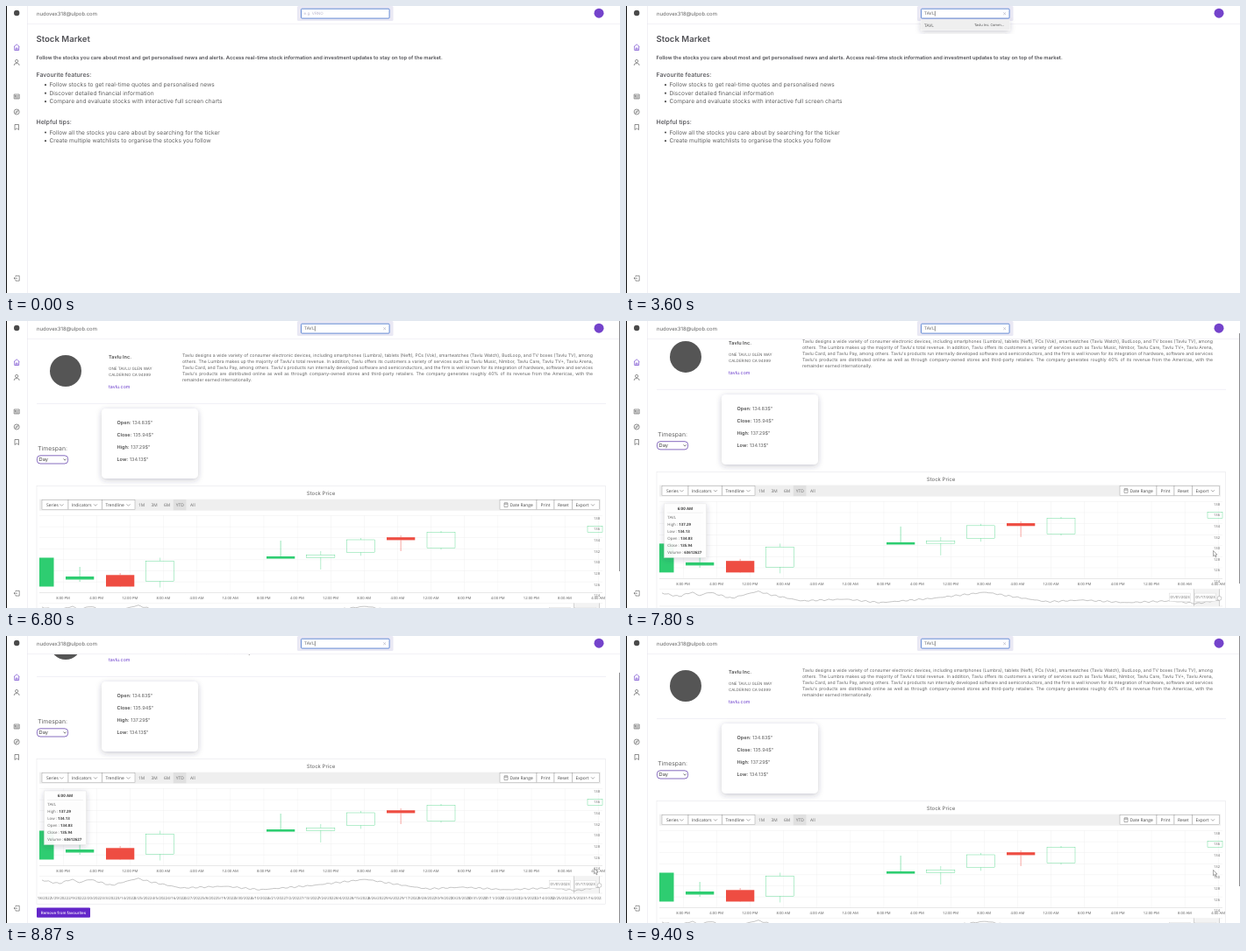
Animation, 700 px wide and 328 px high, one loop 9.79 s. Source, as an HTML page:

```html
<!DOCTYPE html>
<html lang="en">
<head>
<meta charset="utf-8">
<title>Stock search</title>
<style>
html, body { margin: 0; width: 100%; height: 100%; overflow: hidden; background: #fff; }
svg { display: block; width: 100vw; height: 100vh; }
text { font-family: Inter, "Open Sans", sans-serif; text-rendering: geometricPrecision; white-space: pre; }
.ui { font-family: "Open Sans", "Noto Sans", sans-serif; }
.about { font: 5.1px/7.05px Inter, sans-serif; color: #666; text-rendering: geometricPrecision; }
.about div { white-space: nowrap; text-align-last: justify; }
.about div:last-child { text-align-last: left; }
</style>
</head>
<body>
<svg id="stage" viewBox="0 0 700 328" xmlns="http://www.w3.org/2000/svg"></svg>
<script>
const LOOP = 9790, TICKER = 'TAVL', PURPLE = '#6a3ccb', GREEN = '#2ecd71', RED = '#ee4d42';
const MAX_SCROLL = 48;

// y is the visual middle of the text
const text = (x, y, s, size, o = {}) =>
  `<text x="${x}" y="${(y + size * .34).toFixed(2)}" font-size="${size}" fill="${o.fill || '#626262'}"` +
  ` font-weight="${o.weight || 400}" text-anchor="${o.anchor || 'start'}" class="${o.cls || ''}"` +
  `${o.id ? ` id="${o.id}"` : ''}>${s}</text>`;
const ui = (x, y, s, size, o = {}) => text(x, y, s, size, { cls: 'ui', ...o });
const rect = (x, y, w, h, fill, more = '') =>
  `<rect x="${x}" y="${y}" width="${w}" height="${h}" fill="${fill}" ${more}/>`;
const path = (d, stroke, width = .5, more = '') =>
  `<path d="${d}" fill="none" stroke="${stroke}" stroke-width="${width}" ${more}/>`;
const group = (id, body, more = '') => `<g id="${id}" ${more}>${body}</g>`;
const range = n => [...Array(n).keys()];

function introPage() {
  const item = (y, s) => `<circle cx="45" cy="${y + .2}" r="1.1" fill="#555"/>` + text(49.5, y, s, 6.59);
  return text(34.5, 38, 'Stock Market', 9.58, { weight: 600, fill: '#505055' }) +
    text(34.5, 59, 'Follow the stocks you care about most and get personalised news and alerts. Access real-time stock information and investment updates to stay on top of the market.', 5.81, { weight: 600, fill: '#505055' }) +
    text(34.5, 78.5, 'Favourite features:', 7.02, { weight: 500, fill: '#505055' }) +
    item(90, 'Follow stocks to get real-time quotes and personalised news') +
    item(99.5, 'Discover detailed financial information') +
    item(109, 'Compare and evaluate stocks with interactive full screen charts') +
    text(34.5, 133, 'Helpful tips:', 7.02, { weight: 500, fill: '#505055' }) +
    item(144.3, 'Follow all the stocks you care about by searching for the ticker') +
    item(154, 'Create multiple watchlists to organise the stocks you follow');
}

// "|" and "^" mark the line breaks of the narrow and the wide column
const about = 'Tavlu designs a wide variety of consumer electronic devices, including smartphones (Lumbra), tablets (Neft), PCs (Vok), smartwatches (Tavlu Watch), BudLoop, and TV boxes (Tavlu TV), among |others. The ^Lumbra makes up the majority of Tavlu\'s total revenue. In addition, Tavlu offers its customers a variety of services such as Tavlu Music, Nimbor, Tavlu Care, Tavlu TV+, Tavlu Arena, |Tavlu Card, and Tavlu ^Pay, among others. Tavlu\'s products run internally developed software and semiconductors, and the firm is well known for its integration of hardware, software and services. |Tavlu\'s products are distributed ^online as well as through company-owned stores and third-party retailers. The company generates roughly 40% of its revenue from the Americas, with the |remainder earned internationally.';

function aboutBlock(id, x, mark, other) {
  const lines = about.replaceAll(other, '').split(mark).map(s => `<div>${s.trim()}</div>`).join('');
  return `<foreignObject id="${id}" x="${x}" y="37" width="${669 - x}" height="45">` +
    `<div xmlns="http://www.w3.org/1999/xhtml" class="about">${lines}</div></foreignObject>`;
}

function company() {
  return group('logo', '<circle cx="68" cy="57" r="18" fill="#555"/>') +
    group('contact',
      text(117, 41, 'Tavlu Inc.', 5.6, { weight: 600, fill: '#505050' }) +
      text(117, 54.2, 'ONE TAVLU GLEN WAY', 4.5) +
      text(117, 61.3, 'CALDERINO CA 94999', 4.45) +
      text(117, 75.6, 'tavlu.com', 5.3, { fill: PURPLE })) +
    aboutBlock('aboutNarrow', 201, '|', '^') + aboutBlock('aboutWide', 180, '^', '|');
}

function summary() {
  const prices = [['Open', '134.83'], ['Close', '135.94'], ['High', '137.29'], ['Low', '134.13']];
  return rect(35, 94, 649, .6, '#e8e6f0') +
    rect(109, 100, 110, 80, '#fff', 'rx="5" filter="url(#shade)"') +
    prices.map(([k, v], i) => text(126.5, 116.2 + i * 14.1,
      `<tspan font-weight="600" fill="#505050">${k}:</tspan> ${v}$"`, 5.5)).join('') +
    text(36.3, 145.5, 'Timespan:', 6.8) +
    rect(35.4, 153.8, 35.2, 9.2, '#fff', 'rx="3.6" stroke="#7a5cb8" stroke-width=".9"') +
    text(37.6, 158.4, 'Day', 5.7, { fill: '#444' }) +
    path('M65.6 157.5l1.6 1.7 1.6-1.7', '#444', .7);
}

function toolbar() {
  const button = (x, w, s, tx) => rect(x, 204.7, w, 11, '#fff', 'stroke="#999" stroke-width=".45"') +
    ui(tx, 210.2, s, 4.9, { fill: '#444' });
  const arrow = x => path(`M${x} 209.3l2 2 2-2`, '#555', .5);
  const spans = ['1M', '3M', '6M', 'YTD', 'All'];
  return rect(38, 203.7, 640, 13, '#efefef') +
    button(41, 30, 'Series', 46) + arrow(61.5) +
    button(71, 38.5, 'Indicators', 75) + arrow(100) +
    button(109.5, 37.5, 'Trendline', 113.5) + arrow(137.5) +
    rect(190.8, 204, 14.6, 12.3, '#e0e0e0') +
    spans.map((s, i) => ui(154.5 + i * 14.6, 210.3, s, 4.9, { anchor: 'middle', fill: '#6a6a6a' })).join('') +
    button(563, 42, 'Date Range', 574.5) +
    path('M568 208h4v4.5h-4zM568 209.3h4M569 207.2v1M571 207.2v1', '#555', .45) +
    button(605, 20, 'Print', 609.5) + button(625, 20.5, 'Reset', 629) +
    button(645.5, 31, 'Export', 649.5) + arrow(667);
}

// left, width, body top, body bottom, wick top, wick bottom, colour, solid
const candles = [
  [38, 16.5, 270.5, 303.5, 270.5, 303.5, GREEN, 1],
  [68, 32.3, 292, 295.5, 281, 298, GREEN, 1],
  [114, 32.3, 290.3, 303.5, 288, 304, RED, 1],
  [159.5, 32.3, 274.3, 297.3, 270.5, 304.5, GREEN, 0],
  [297, 32.3, 269, 271.6, 251, 271.6, GREEN, 1],
  [342.6, 32.3, 267.3, 270.2, 263, 284, GREEN, 0],
  [388.4, 32.3, 250, 264.5, 248, 268.3, GREEN, 0],
  [434, 32.3, 247.2, 250.4, 245, 263, RED, 1],
  [480, 32, 241.8, 259.5, 240, 261.3, GREEN, 0],
  [663, 17, 234.5, 241.5, 234.5, 241.5, GREEN, 0]
];

function candle([x, w, top, bottom, high, low, colour, solid]) {
  const mid = x + w / 2;
  return path(`M${mid} ${high}V${top}M${mid} ${bottom}V${low}`, colour, solid ? .5 : .35) +
    (solid ? rect(x, top, w, bottom - top, colour)
      : rect(x, top, w, bottom - top, 'none', `stroke="${colour}" stroke-width=".35"`));
}

function plot() {
  const hours = ['8:00 PM', '4:00 PM', '12:00 PM', '8:00 AM', '4:00 AM', '12:00 AM'];
  const rows = range(8).map(i => 222.3 + i * 12.6);
  const cols = range(17).map(i => 65 + i * 38.13);
  return rows.map(y => rect(38, y, 642, .4, '#ebebeb')).join('') +
    cols.map(x => rect(x, 222, .4, 88.5, '#ededed')).join('') +
    rect(38, 310.3, 642, .5, '#d8d8d8') +
    candles.map(candle).join('') +
    rows.map((y, i) => ui(677, 225.4 + i * 12.62, 138 - 2 * i, 4.1, { anchor: 'end', fill: '#666' })).join('') +
    cols.map((x, i) => ui(x, 317, hours[i % 6], 4.2, { anchor: 'middle', fill: '#5a5a5a' })).join('');
}

function rangeBar() {
  const knots = [[41, 327], [60, 331], [75, 326], [84, 330], [95, 326], [120, 333], [150, 325], [165, 329],
    [200, 336], [250, 334], [290, 338], [350, 333], [410, 326], [440, 331], [480, 337], [520, 335],
    [570, 338], [620, 336], [650, 339], [677, 335]];
  let line = '', k = 0;
  for (let x = 41; x <= 676; x += 2.5) {
    while (x > knots[k + 1][0]) k++;
    const [a, b] = [knots[k], knots[k + 1]];
    const y = a[1] + (b[1] - a[1]) * (x - a[0]) / (b[0] - a[0]) + Math.sin(x * 1.9) * .5 + Math.sin(x * .73) * .4;
    line += `${line ? 'L' : 'M'}${x} ${y.toFixed(1)}`;
  }
  const dates = range(34).map(i => {
    const d = new Date(2022, 0, 18 + 11 * i);
    return ui(42 + i * 19.05, 348, `${d.getMonth() + 1}/${d.getDate()}/${d.getFullYear()}`, 4.3, { anchor: 'middle' });
  }).join('');
  const tag = (x, s) => rect(x, 327.2, 24, 9.4, '#fff', 'stroke="#d0d0d0" stroke-width=".4"') +
    ui(x + 12, 332, s, 4.2, { anchor: 'middle' });
  return path('M38 322.5H680', '#ebebeb') + path('M38 342H680', '#e2e2e2') +
    rect(647.5, 322.5, 29, 19.5, '#f3f3f3') + path(line, '#8a8a8a', .5) +
    path('M647.5 322.5v19.5M676.5 322.5v19.5', '#aaa', .5) +
    '<circle cx="676.5" cy="333" r="2.4" fill="#fff" stroke="#999" stroke-width=".5"/>' +
    tag(619.5, '01/01/2023') + tag(648.5, '01/17/2023') +
    `<g clip-path="url(#dates)">${dates}</g>`;
}

function tooltip() {
  const rows = [['High', '137.29'], ['Low', '134.13'], ['Open', '134.83'], ['Close', '135.94'], ['Volume', '63612627']];
  return rect(43.5, 225, 48, 61.5, '#fff', 'fill-opacity=".94" filter="url(#shade)"') +
    rect(43.5, 225, 48, 61.5, 'none', 'stroke="#ddd" stroke-width=".4"') +
    ui(67.5, 230.6, '6:00 AM', 4.5, { anchor: 'middle', weight: 700, fill: '#444' }) +
    rect(47, 235, 41, .4, '#ddd') + ui(47.3, 240.4, TICKER, 4.4) +
    rows.map(([k, v], i) => ui(47.3, 248.5 + i * 8,
      `${k} : <tspan font-weight="700" fill="#444">${v}</tspan>`, 4.4)).join('');
}

function stockPage() {
  return company() + group('lower', summary() +
    rect(35, 188.7, 648.5, 166, '#fff', 'stroke="#e2e2e8" stroke-width=".5"') +
    text(359, 196.8, 'Stock Price', 6, { anchor: 'middle' }) +
    toolbar() + plot() + rangeBar() +
    rect(35, 358.5, 61, 11.2, '#6326c9', 'rx="1"') +
    text(65.5, 364, 'Remove from favourites', 4.5, { anchor: 'middle', weight: 500, fill: '#fff' }) +
    group('tip', tooltip()));
}

function sidebar() {
  const dark = '#555';
  return rect(0, 0, 24, 328, '#fff') + rect(24, 0, .6, 328, '#e8e7ee') + rect(0, 0, 1, 328, '#111') +
    '<circle cx="12.2" cy="8" r="3.2" fill="#4a4a4a"/>' +
    path('M9 46.6l3.2-2.8 3.2 2.8M9.7 46.2v4.3h5v-4.3M11.3 50.5v-2.4h1.8v2.4', PURPLE, .65) +
    '<circle cx="12.2" cy="63" r="1.6" fill="none" stroke="#555" stroke-width=".65"/>' +
    path('M9.4 68v-.7q0-1.6 1.6-1.6h2.4q1.6 0 1.6 1.6v.7', dark, .65) +
    path('M9.2 101h6v5h-6zM10.3 102.4h1.6v1.4h-1.6zM12.8 102.6h1.6M12.8 103.8h1.6M10.3 105h4.1', dark, .6) +
    '<circle cx="12.2" cy="121" r="3" fill="none" stroke="#555" stroke-width=".65"/>' +
    path('M13.6 119.6l-.8 2-2 .8.8-2z', dark, .55) +
    path('M10 135.5h4.5v6l-2.25-1.7-2.25 1.7z', dark, .65) +
    path('M11 309.3v-1h4.2v5.8H11v-1M9 311.2h4M10.4 309.9L9 311.2l1.4 1.3', dark, .6);
}

function header() {
  return rect(24, 0, 674, 20.5, '#fff') + rect(24, 20.2, 676, .6, '#ebeaf1') +
    text(35, 9, 'nudovex318@ulpob.com', 5.93) +
    '<circle cx="676" cy="8.2" r="5.5" fill="#7443cb"/>' +
    rect(332, 0, 109.5, 17, '#e9e8f4', 'rx="1.5"') +
    rect(336.5, 3.2, 100.6, 10.9, '#fff', 'rx="1" stroke="#5680d2" stroke-width=".9"') +
    text(339.6, 8.7, 'e.g. VRNO', 4.5, { id: 'hint', fill: '#b9b5cc' }) +
    text(340, 8.7, '', 4.75, { id: 'typed' }) +
    group('caret', rect(0, 5.6, .6, 6, '#444')) +
    group('clear', path('M430.2 7.3l2.8 2.8M433 7.3l-2.8 2.8', '#9a9ab0', .5));
}

function menu(id, rows, rowH) {
  return group(id, rect(336.3, 15.7, 101, rows.length * rowH + .6, '#fff', 'filter="url(#shade)"') +
    (id === 'match' ? group('hover', rect(336.3, 16, 101, rowH, '#efefef')) : '') +
    rows.map(([s, name], i) => ui(340, 16 + rowH * (i + .53), s, 4.9, { fill: '#555' }) +
      ui(431, 16 + rowH * (i + .53), name, 4, { anchor: 'end', fill: '#444' })).join(''));
}
const listings = 'Qor Bex Vun Zim Jod Wep Kyl Hux Gav'.split(' ');
const suggest = (prefix, shift) => listings.map((_, i) => {
  const s = listings[(i + shift) % 9];
  return [prefix + s.slice(0, 4 - prefix.length).toUpperCase(), `${prefix[0]}${prefix[1] ? 'a' : 'e'}${s.toLowerCase()} Inc. Comm...`];
});

const stage = document.getElementById('stage');
stage.innerHTML = `<defs>
  <clipPath id="page"><rect x="25" y="21" width="675" height="307"/></clipPath>
  <clipPath id="dates"><rect x="36" y="340" width="643" height="16"/></clipPath>
  <filter id="shade" x="-20%" y="-20%" width="140%" height="150%">
    <feDropShadow dx="0" dy="1.8" stdDeviation="3" flood-color="#34344c" flood-opacity=".26"/>
  </filter></defs>` + rect(0, 0, 700, 328, '#fff') +
  `<g clip-path="url(#page)">${group('intro', introPage())}${group('stock', stockPage())}</g>` +
  header() + sidebar() +
  menu('listOne', suggest('T', 0), 11) + menu('listTwo', suggest('TA', 4), 11) +
  menu('match', [[TICKER, 'Tavlu Inc. Comm...']], 11.3) +
  group('thumb', rect(699, 0, 1, 286, '#8c8c90')) +
  group('mouse', '<path d="M0 0v6.4l1.5-1.4 1.1 2.4 1-.5-1.1-2.3h2z" fill="#fff" stroke="#444" stroke-width=".45"/>');

const el = {};
stage.querySelectorAll('[id]').forEach(n => el[n.id] = n);
const show = (id, on) => el[id].style.display = on ? '' : 'none';
const move = (id, x, y) => el[id].setAttribute('transform', `translate(${x} ${y})`);
const ramp = (t, a, b) => Math.min(1, Math.max(0, (t - a) / (b - a)));
const within = (t, a, b) => t >= a && t < b;
const easeOut = p => 1 - (1 - p) ** 2;
const keyTimes = [270, 800, 1400, 1670];
const blinks = [[2000, 2530], [3070, 3600], [5670, 6200]];

function render(t) {
  const typed = TICKER.slice(0, keyTimes.filter(k => t >= k).length);
  if (el.typed.textContent !== typed) el.typed.textContent = typed;
  show('hint', !typed);
  show('clear', typed);
  show('caret', typed && !blinks.some(([a, b]) => within(t, a, b)));
  move('caret', 340.3 + (typed ? el.typed.getComputedTextLength() : 0), 0);

  show('listOne', within(t, 330, 870));
  show('listTwo', within(t, 870, 1470));
  show('match', within(t, 1470, 4000));
  show('hover', t >= 3130);

  const loaded = t >= 5330, open = t >= 5130;
  show('intro', t < 4070);
  show('stock', open);
  show('logo', loaded);
  show('aboutNarrow', loaded);
  show('aboutWide', !loaded);
  move('contact', loaded ? 0 : -24.5, 0);
  move('lower', 0, loaded ? 0 : -3.5);

  const scroll = MAX_SCROLL * (easeOut(ramp(t, 7690, 8290)) - easeOut(ramp(t, 8930, 9330)));
  move('stock', 0, -scroll);
  show('thumb', open);
  move('thumb', 0, scroll * 328 / 376);
  show('tip', within(t, 7470, 9200));
  show('mouse', t >= 7400);
  move('mouse', 669.5 + ramp(t, 7930, 8870) - ramp(t, 8930, 9330), 262.5 + 3 * ramp(t, 7930, 8870) + 2 * ramp(t, 8930, 9330));
}

const start = performance.now();
function tick() {
  render((performance.now() - start) % LOOP);
  requestAnimationFrame(tick);
}
tick();
</script>
</body>
</html>
```
